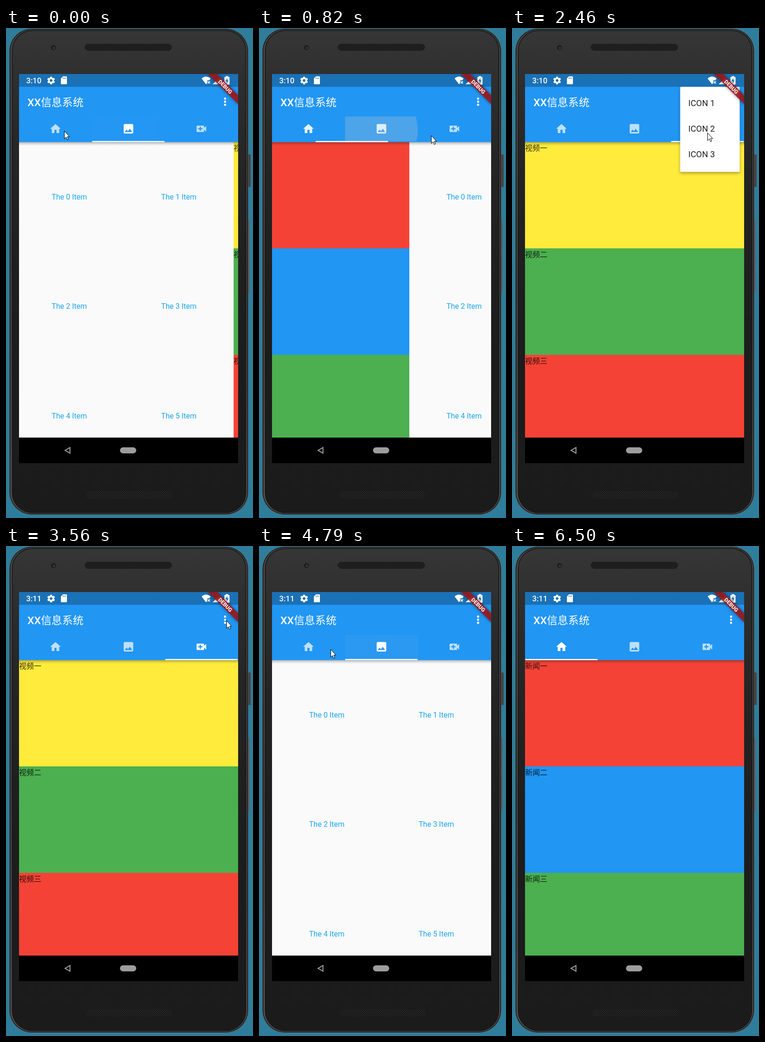
An HTML page for the animation above (7.09 s loop, 531 by 1054 pixels).

```html
<!DOCTYPE html>
<html lang="zh">
<head>
<meta charset="utf-8">
<title>Tabs</title>
<style>
  html, body { margin: 0; width: 100%; height: 100%; overflow: hidden; background: #2f7d9a; }
  svg { display: block; width: 100vw; height: 100vh; }
  text { font-family: Roboto, "Noto Sans CJK SC", "Noto Sans CJK", sans-serif; }
  .label { font-size: 16px; fill: rgba(0,0,0,.8); }
  .item { font-size: 16px; fill: #1ba5f2; text-anchor: middle; }
  .entry { font-size: 18.3px; fill: rgba(0,0,0,.87); }
  #menu { filter: drop-shadow(0 3px 3px rgba(0,0,0,.33)); }
</style>
</head>
<body>
<svg viewBox="0 0 531 1054" preserveAspectRatio="none">
  <defs>
    <linearGradient id="shell" x1="0" y1="0" x2="0" y2="1">
      <stop offset="0" stop-color="#363636"/>
      <stop offset=".1" stop-color="#2f2f2f"/>
      <stop offset=".3" stop-color="#242424"/>
      <stop offset=".6" stop-color="#1d1d1d"/>
      <stop offset="1" stop-color="#1b1b1b"/>
    </linearGradient>
    <linearGradient id="rim" x1="0" y1="0" x2="0" y2="1">
      <stop offset="0" stop-color="#484848"/>
      <stop offset=".5" stop-color="#3e3e3e"/>
      <stop offset="1" stop-color="#505050"/>
    </linearGradient>
    <linearGradient id="drop" x1="0" y1="0" x2="0" y2="1">
      <stop offset="0" stop-color="#000" stop-opacity=".32"/>
      <stop offset=".4" stop-color="#000" stop-opacity=".13"/>
      <stop offset="1" stop-color="#000" stop-opacity="0"/>
    </linearGradient>
    <pattern id="mesh" width="4" height="4" patternUnits="userSpaceOnUse">
      <rect width="4" height="4" fill="#323232"/>
      <circle cx="1" cy="1" r="1.1" fill="#050505"/>
      <circle cx="3" cy="3" r="1.1" fill="#050505"/>
    </pattern>
    <filter id="soft" x="-20%" y="-100%" width="140%" height="300%"><feGaussianBlur stdDeviation="3.4"/></filter>
    <clipPath id="screen"><rect x="28" y="99" width="471" height="837"/></clipPath>
    <clipPath id="body"><rect x="28" y="245" width="471" height="636"/></clipPath>
    <clipPath id="tabClip"><rect id="tabBox" y="190.5" width="157" height="53"/></clipPath>
    <clipPath id="rowClip"><rect x="361.5" y="190.5" width="128" height="55"/></clipPath>
  </defs>

  <!-- device -->
  <rect width="531" height="1054" fill="#2f7d9a"/>
  <rect x="518" y="272" width="8" height="70" rx="1.5" fill="#474343"/>
  <rect x="518" y="413" width="5.500" height="157" rx="1.5" fill="#5c5c61"/>
  <rect x="7.5" y="1.5" width="513" height="1045" rx="48" fill="#1a1a1a" stroke="#4f4f4f"/>
  <rect x="9.5" y="3.5" width="509" height="1041" rx="46" fill="url(#rim)"/>
  <rect x="13.5" y="5.5" width="502" height="1037" rx="43" fill="url(#shell)" stroke="#131313" stroke-width="1.5"/>
  <circle cx="102" cy="42" r="5.5" fill="#202020"/><circle cx="103" cy="43" r="1.8" fill="#4a4a4a"/>
  <rect x="169" y="34" width="188" height="15" rx="7.5" fill="url(#mesh)"/>
  <rect x="173" y="996" width="184" height="16" rx="7" fill="url(#mesh)"/>

  <g clip-path="url(#screen)">
    <rect x="28" y="245" width="471" height="636" fill="#fafafa"/>
    <g clip-path="url(#body)"><g id="pages"></g></g>
    <rect x="28" y="245.500" width="471" height="8" fill="url(#drop)"/>

    <!-- bars -->
    <rect x="28" y="126" width="471" height="119.500" fill="#2196f3"/>
    <rect x="28" y="99" width="471" height="27.500" fill="#1b71b6"/>
    <text id="clock" x="43.500" y="119" font-size="16.500" font-weight="500" fill="#fff"></text>
    <path transform="translate(87 103) scale(.83)" fill="#fff" d="M19.430 12.980c.04-.32.07-.64.07-.98s-.03-.66-.07-.98l2.110-1.650c.19-.15.24-.42.12-.64l-2-3.460c-.12-.22-.39-.3-.61-.22l-2.490 1c-.52-.4-1.080-.73-1.690-.98l-.38-2.650C14.460 2.180 14.250 2 14 2h-4c-.25 0-.46.18-.49.42l-.38 2.650c-.61.25-1.170.59-1.690.98l-2.490-1c-.23-.09-.49 0-.61.22l-2 3.460c-.13.22-.07.49.12.64l2.110 1.650c-.04.32-.07.65-.07.98s.03.66.07.98l-2.110 1.650c-.19.15-.24.42-.12.64l2 3.460c.12.22.39.3.61.22l2.490-1c.52.4 1.080.73 1.690.98l.38 2.650c.03.24.24.42.49.42h4c.25 0 .46-.18.49-.42l.38-2.650c.61-.25 1.170-.59 1.690-.98l2.490 1c.23.09.49 0 .61-.22l2-3.460c.12-.22.07-.49-.12-.64zM12 15.500c-1.930 0-3.500-1.570-3.500-3.500s1.570-3.500 3.500-3.500 3.500 1.570 3.500 3.500-1.570 3.500-3.500 3.500z"/>
    <path d="M122.500 104h7q1.500 0 1.500 1.500v14q0 1.500-1.500 1.500h-10q-1.500 0-1.500-1.500v-11z" fill="#fff"/>
    <path d="M122.500 106.500v3M125.300 106.500v3M128 106.500v3" stroke="#1b71b6" stroke-width="1.200"/>
    <path d="M430 121L420.500 108.500Q430 100.500 440 108.500L437 112.500H432.500V118z" fill="#fff"/>
    <path d="M433.500 114.500l5 5m0-5l-5 5" stroke="#fff" stroke-width="1.600"/>
    <path d="M444.500 121L459 106.500V121z" fill="#fff"/>
    <path d="M469.500 105.500h3v-2h5v2h3v16.500h-11z" fill="#fff"/>
    <path d="M476 107.500l-4.500 7h3v5l4-7h-2.500z" fill="#1b71b6"/>
    <text x="46" y="168" font-size="22.900" fill="#fff"><tspan font-weight="500">XX</tspan>信息系统</text>
    <g fill="#fff"><circle cx="471" cy="152" r="2.400"/><circle cx="471" cy="158.600" r="2.400"/><circle cx="471" cy="165.200" r="2.400"/></g>

    <!-- tabs -->
    <g clip-path="url(#tabClip)" fill="#c8c8c8">
      <rect id="glow" x="28" y="190" width="471" height="54"/>
      <circle id="splash" cy="220"/>
    </g>
    <g fill="#fff" fill-rule="evenodd">
      <path class="tab" transform="translate(92.600 203) scale(1.146)" d="M10 20v-6h4v6h5v-8h3L12 3 2 12h3v8z"/>
      <path class="tab" transform="translate(249.500 203) scale(1.146)" d="M21 19V5c0-1.100-.9-2-2-2H5c-1.100 0-2 .9-2 2v14c0 1.100.9 2 2 2h14c1.100 0 2-.9 2-2zM8.500 13.500l2.500 3.010L14.500 12l4.500 6H5z"/>
      <path class="tab" transform="translate(406.300 203) scale(1.146)" d="M17 10.500V7c0-.55-.45-1-1-1H4c-.55 0-1 .45-1 1v10c0 .55.45 1 1 1h12c.55 0 1-.45 1-1v-3.500l4 4v-11zM14 13h-3v3H9v-3H6v-2h3V8h2v3h3z"/>
    </g>
    <rect id="bar" y="243" width="155.500" height="2.500" fill="#fff"/>

    <!-- navigation -->
    <rect x="28" y="881" width="471" height="55" fill="#000"/>
    <path d="M137.500 902.500v12l-10.500-6z" fill="none" stroke="#a3a3a3" stroke-width="2"/>
    <rect x="245" y="902" width="35" height="13" rx="6.500" fill="#9d9d9d"/>

    <g id="menu">
      <rect id="sheet" y="126.500" rx="2" fill="#fff"/>
      <circle id="press" cx="418" cy="226" fill="#c8c8c8" opacity=".4" clip-path="url(#rowClip)"/>
      <text class="entry" x="379" y="168">ICON 1</text>
      <text class="entry" x="379" y="223">ICON 2</text>
      <text class="entry" x="379" y="278">ICON 3</text>
    </g>

    <g transform="translate(499 99) rotate(45)">
      <rect x="-46" y="32.100" width="92" height="13.700" opacity=".5" filter="url(#soft)"/>
      <rect x="-70" y="32.100" width="140" height="13.700" fill="#a3181b" fill-opacity=".85"/>
      <text y="43.100" font-size="11.700" font-weight="900" fill="#fff" fill-opacity=".92" text-anchor="middle">DEBUG</text>
    </g>
  </g>

  <path id="cursor" d="M.5.500V17.200L4.300 13.700L6.800 19.500L9.300 18.400L6.900 12.800H11.500z" fill="#fff" stroke="#000"/>
</svg>

<script>
const $ = id => document.getElementById(id);
const LOOP = 7090, STEP = 135.5;       // the screen refreshes once per step
const LEFT = 28, TOP = 245.5, WIDTH = 471, TAB = 157, BAND = 229;

// each tap on a tab slides the pages over
const slides = [
  { from: 2, to: 1, start: -311, ms: 340 },
  { from: 1, to: 0, start: 81, ms: 340 },
  { from: 0, to: 1, start: 672, ms: 340 },
  { from: 1, to: 2, start: 1160, ms: 340 },
  { from: 2, to: 1, start: 4460, ms: 183 },
  { from: 1, to: 0, start: 4899, ms: 340 }
];
const menus = [{ open: 1802, pick: 2534, close: 2640 }, { open: 3515, close: 4250 }];

// where the mouse turns: time, x, y
const path = [
  [0, 125, 221], [420, 125, 221], [680, 255, 221], [813, 370, 231], [1160, 419, 218],
  [1355, 447, 193], [1500, 462, 160], [1950, 461, 160], [2439, 420, 225], [2574, 419, 226],
  [2981, 407, 287], [3388, 475, 159], [3800, 471, 162], [4200, 314, 255], [4471, 238, 222],
  [4890, 108, 222], [5149, 325, 288], [5420, 511, 600], [6097, 212, 997], [6368, 510, 930]
];

const clamp = v => Math.max(0, Math.min(1, v));
const mix = (a, b, u) => a + (b - a) * u;
const ease = v => { const u = clamp(v); return u * u * (3 - 2 * u); };
const latest = (list, key, t) => list.filter(e => e[key] <= t).pop();
const set = (el, attrs) => Object.entries(attrs).forEach(([k, v]) => el.setAttribute(k, v));

function mouse(t) {
  const i = path.findIndex(p => p[0] > t);
  if (i < 0) return path[path.length - 1].slice(1);
  const [t0, x0, y0] = path[i - 1], [t1, x1, y1] = path[i];
  const u = (t - t0) / (t1 - t0);
  return [mix(x0, x1, u), mix(y0, y1, u)];
}

function bands(page, word, colors) {
  const x = LEFT + page * WIDTH;
  return colors.map((c, i) => {
    const y = TOP + i * BAND;
    return `<rect x="${x}" y="${y - .5}" width="${WIDTH}" height="${BAND + .5}" fill="${c}"/>` +
      `<text class="label" x="${x}" y="${y + 18}">${word}${'一二三'[i]}</text>`;
  }).join('');
}
function grid() {
  const tile = WIDTH / 2;
  return Array.from({ length: 6 }, (_, i) => {
    const x = LEFT + WIDTH + tile * (i % 2 + .5), y = TOP + tile * ((i >> 1) + .5) + 5.5;
    return `<text class="item" x="${x}" y="${y}">The ${i} Item</text>`;
  }).join('');
}
$('pages').innerHTML = bands(0, '新闻', ['#f44336', '#2196f3', '#4caf50']) + grid() +
  bands(2, '视频', ['#ffeb3b', '#4caf50', '#f44336']);

const tabs = document.querySelectorAll('.tab');
const entries = document.querySelectorAll('.entry');

function drawTabs(t) {
  const { from, to, start, ms } = latest(slides, 'start', t);
  const age = t - start;
  const page = mix(from, to, ease(age / ms));
  const bar = mix(from, to, ease(1.36 * age / ms));
  $('pages').setAttribute('transform', `translate(${-page * WIDTH} 0)`);
  $('bar').setAttribute('x', LEFT + .3 + bar * TAB);
  tabs.forEach((e, i) => e.setAttribute('opacity', .7 + .3 * clamp(1 - Math.abs(i - page))));

  const fade = 1 - clamp((age - 165) / 150);
  $('tabBox').setAttribute('x', LEFT + to * TAB);
  $('glow').setAttribute('opacity', .03 * fade);
  set($('splash'), { cx: mouse(Math.max(0, start))[0], r: age * .64, opacity: .24 * clamp(age / 100) * fade });
}

function drawMenu(t) {
  const { open, pick, close } = latest(menus, 'open', t) || { open: t, close: t };
  const grow = ease((t - open) / 288), h = 183 * grow, w = 128 * clamp(grow * 3);
  $('menu').style.opacity = Math.min(clamp((t - open) / 150), 1 - clamp((t - close) / 140));
  set($('sheet'), { x: 489.5 - w, width: w, height: h });
  entries.forEach((e, i) => e.setAttribute('opacity', clamp((h - 50 - 55 * i) / 23)));
  $('press').setAttribute('r', t > pick ? (t - pick) * .64 : 0);
}

function draw(t) {
  drawTabs(t);
  drawMenu(t);
  $('clock').textContent = t < 2970 ? '3:10' : '3:11';
  set($('cursor'), {
    transform: `translate(${mouse(t).join(' ')})`,
    visibility: t < 6500 ? 'visible' : 'hidden'
  });
}

const begin = performance.now();
let shown = -1;
function frame() {
  const t = (performance.now() - begin) % LOOP;
  const step = Math.floor((t + 21) / STEP);
  if (step !== shown) draw((shown = step) * STEP);
  requestAnimationFrame(frame);
}
frame();
</script>
</body>
</html>
```
